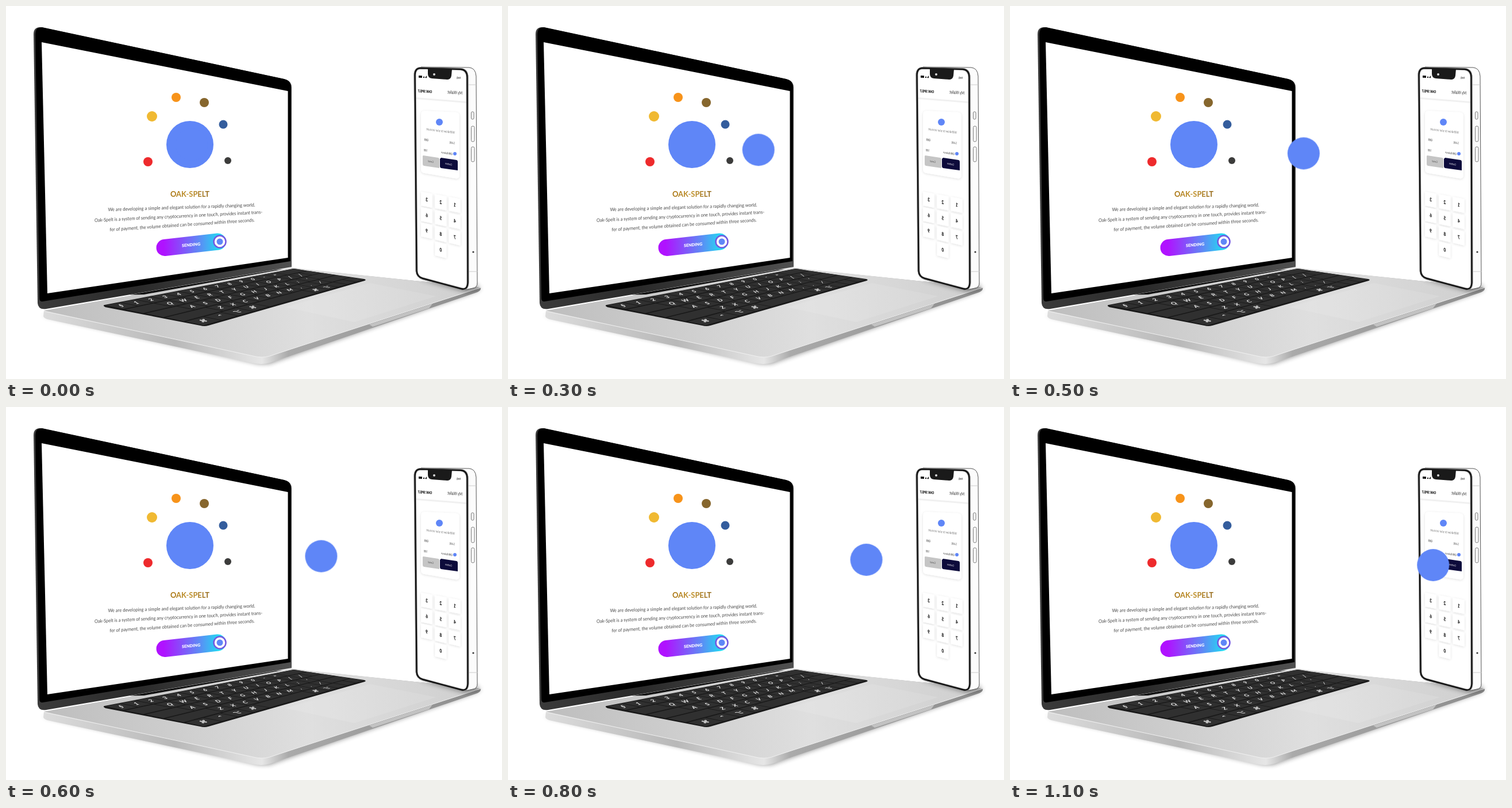
An HTML page that plays this animation: 863x649 px, repeating every 1.2 s.

```html
<!DOCTYPE html>
<html lang="en">
<head>
<meta charset="utf-8">
<title>Sending between devices</title>
<style>
  html, body { margin: 0; width: 100%; height: 100%; overflow: hidden; background: #fff; }
  svg { display: block; }
  text { font-family: Lato, "Open Sans", sans-serif; text-anchor: middle; }
  .copy { font-size: 8.4px; fill: #4a4a4a; }
  .token { animation: fly 1200ms steps(12, end) infinite; }
  @keyframes fly {
    from { transform: translate(323px, 241px); }
    to { transform: translate(773.8px, 278.2px); }
  }
</style>
</head>
<body>
<svg id="stage" width="863" height="649" viewBox="0 0 863 649">
  <defs>
    <linearGradient id="pill" gradientUnits="userSpaceOnUse" x1="262" y1="0" x2="384" y2="0">
      <stop offset=".1" stop-color="#b012ff"/>
      <stop offset=".6" stop-color="#5f88f5"/>
      <stop offset=".9" stop-color="#20dcf2"/>
    </linearGradient>
    <linearGradient id="gold" x1="0" x2="1">
      <stop offset="0" stop-color="#a87410"/>
      <stop offset=".5" stop-color="#c1922c"/>
      <stop offset="1" stop-color="#94691a"/>
    </linearGradient>
    <linearGradient id="deck" gradientUnits="userSpaceOnUse" x1="70" y1="530" x2="800" y2="490">
      <stop offset="0" stop-color="#bebebe"/>
      <stop offset=".35" stop-color="#d0d0d0"/>
      <stop offset=".62" stop-color="#dfdfdf"/>
      <stop offset="1" stop-color="#d0d0d0"/>
    </linearGradient>
    <linearGradient id="edge" gradientUnits="userSpaceOnUse" x1="65" y1="0" x2="826" y2="0">
      <stop offset="0" stop-color="#dcdcdc"/>
      <stop offset=".3" stop-color="#b8b8b8"/>
      <stop offset=".5" stop-color="#e6e6e6"/>
      <stop offset=".56" stop-color="#aaa"/>
      <stop offset="1" stop-color="#8d8d8d"/>
    </linearGradient>
    <linearGradient id="lid" x1="0" x2="1">
      <stop offset="0" stop-color="#3b3b3b"/>
      <stop offset=".4" stop-color="#2a2a2a"/>
      <stop offset="1" stop-color="#505050"/>
    </linearGradient>
    <filter id="soft" x="-20%" y="-20%" width="140%" height="140%"><feGaussianBlur stdDeviation="4"/></filter>
    <filter id="lift" x="-40%" y="-40%" width="180%" height="180%">
      <feDropShadow dx="0" dy="1" stdDeviation="2.2" flood-color="#000" flood-opacity=".13"/>
    </filter>
  </defs>

  <!-- laptop base -->
  <path d="M62 538L440 622L458 622L826 494L760 500L300 545Z" fill="#000" opacity=".45" filter="url(#soft)"/>
  <path d="M66 530L65 540Q66 543 72 545L428 621Q444 625 459 621L820 498Q827 495 826 490L497 456Z" fill="url(#edge)"/>
  <path d="M66 530L497 455L530 459L826 490L459 609Q446 613 430 609Z" fill="url(#deck)"/>
  <path d="M66 531L430 609Q446 613 459 609L826 490" fill="none" stroke="#f0f0f0" stroke-width="1"/>
  <path d="M632 554L638 558L736 526L742 518" fill="#c2c2c2"/>
  <path d="M486 524L633 482L748 505L606 550Z" fill="#fff" opacity=".1"/>
  <path d="M172 520Q167 521 173 524L338 556Q345 558 352 556L624 478Q628 476 623 475L500 457Z" fill="#191919"/>
  <g id="keys"></g>

  <!-- laptop lid -->
  <path d="M48 49Q48 36 61 37L484 127Q497 130 497 142V454L70 527Q56 529 55 517Z" fill="url(#lid)"/>
  <path d="M51 50Q51 36 63 37L484 127Q496 130 496 142L495 444L64 514Q58 515 58 508Z"/>
  <path d="M62 63L490.500 148V438L72 500Z" fill="#fff"/>
  <path d="M215 502.500L470 459L482 458L240 502Z" fill="#111"/>

  <!-- screen content -->
  <g id="coins"></g>
  <circle cx="320" cy="241" r="41" fill="#5f86f7"/>
  <text transform="matrix(.92 0 0 1 320 332)" font-size="14" font-weight="700" fill="url(#gold)">OAK-SPELT</text>
  <text class="copy" transform="matrix(.905 -.029 0 1 305.500 353)">We are developing a simple and elegant solution for a rapidly changing world.</text>
  <text class="copy" transform="matrix(.895 -.044 0 1 300 368.500)">Oak-Spelt is a system of sending any cryptocurrency in one touch, provides instant trans-</text>
  <text class="copy" transform="matrix(.9 -.06 0 1 306.500 383.500)">fer of payment, the volume obtained can be consumed within three seconds.</text>
  <path d="M276 420.500L368.500 410" stroke="url(#pill)" stroke-width="29" stroke-linecap="round"/>
  <circle cx="372" cy="410" r="10.500" fill="#fff" stroke="#7358e0" stroke-width="2.500"/>
  <circle cx="372" cy="410" r="5.500" fill="#5f86f7"/>
  <text transform="matrix(1 -.09 0 1 322 418)" font-size="7.200" font-weight="900" fill="#fff">SENDING</text>

  <!-- phone -->
  <path d="M716 474L800 497L826 492L815 482Z" fill="#000" opacity=".4" filter="url(#soft)"/>
  <path d="M722 106L806 107Q817 108 818 122L820 482Q820 490 812 491L798 494Z" fill="#fcfcfc" stroke="#555" stroke-width="1"/>
  <path id="front" d="M711.500 121Q711 108 722 108L791 110Q802.500 111 802.500 124L803.500 481Q803 495 792 492L725 474Q715 471 714.500 461Z" fill="#fff" stroke="#999" stroke-width="4"/>
  <use href="#front" style="stroke-width: 2.4; stroke: #111"/>
  <path d="M711.500 121Q711 108 722 108L791 110Q802.500 111 802.500 124L803.500 481Q803 495 792 492L725 474Q715 471 714.500 461Z" fill="none" stroke="#111" stroke-width="2.400"/>
  <path d="M734 108L776 109.500L775 121Q774 128 768 128L741 126Q734 125 734 118Z" fill="#1a1a1a"/>
  <circle cx="745" cy="119" r="2" fill="#d8d8d8"/>
  <path d="M714 159L801 166V169L714 162Z" fill="#000" opacity=".06"/>
  <g fill="#fff" stroke="#777" stroke-width="1">
    <rect x="809.500" y="184" width="4.500" height="13" rx="2"/>
    <rect x="809.500" y="209" width="5.500" height="27" rx="2.500"/>
    <rect x="809.500" y="245" width="5.500" height="26" rx="2.500"/>
  </g>
  <circle cx="813" cy="428" r="1.600" fill="#333"/>
  <path d="M805 137H818M806 462H820" stroke="#ccc"/>
  <path d="M718 121L724 121.300V125L718 124.700Z" fill="#111"/>
  <path d="M726 125V123L728 122.500V125ZM729 125L732 121V125.200Z" fill="#111"/>
  <g filter="url(#lift)" fill="#fff">
    <path d="M722 189Q722 182 729 182.500L783 185Q789 185.500 789 192V294Q789 301 782 300L729 291Q722 290 722 284Z"/>
    <path d="M726 226L785 231V244L726 239Z"/>
    <path d="M726 244L785 250V263L726 256Z"/>
  </g>
  <path d="M726 260L752 264Q754 264.500 754 267V282L727 278Q725 277.500 725 275V261Z" fill="#c5c5c5"/>
  <path d="M757 264L784 268Q786 268.500 786 271V286L757 282Q755 281.500 755 279V266Z" fill="#0d0b3b"/>
  <circle cx="754" cy="202" r="6" fill="#5f86f7"/>
  <circle cx="781" cy="257" r="3" fill="#5f86f7"/>
  <g id="pad" filter="url(#lift)" fill="#fff"></g>
  <g id="labels"></g>

  <g class="token"><circle r="28" fill="#5f86f7"/></g>
</svg>
<script>
  const put = (id, html) => document.getElementById(id).innerHTML = html;

  // coins around the centre: x, y, radius, colour
  put('coins', [
    [296, 159, 8, '#f7931a'], [254, 192, 9, '#f0b932'], [345, 168, 8, '#86662d'],
    [378, 206, 7.5, '#345d9d'], [386, 269, 6, '#3c3c3b'], [247, 271, 8, '#ee2a2c']
  ].map(([x, y, r, c]) => `<circle cx="${x}" cy="${y}" r="${r}" fill="${c}"/>`).join(''));

  // keyboard: unit square mapped to the quad on the deck
  const mix = (a, b, t) => a + (b - a) * t;
  function onDeck(t, v) {
    const u = t * 1.25 / (1 + .25 * t);
    return [
      mix(mix(169, 500, u), mix(347, 626, u), v),
      mix(mix(520.5, 456.5, u), mix(556.5, 476, u), v)
    ];
  }
  const rows = [
    { lead: 0, keys: '§1234567890-=', tail: 2 },
    { lead: 2, keys: 'QWERTYUIOP[]', tail: 1 },
    { lead: 2.25, keys: 'ASDFGHJKL;\'', tail: 1.75 },
    { lead: 3, keys: 'ZXCVBNM,./', tail: 2 }
  ].map(({ lead, keys, tail }) => [
    [lead, ''], ...[...keys].map(k => [1, k]), [tail, '']
  ]);
  rows.push([
    [1.4, '⌘'], [1.3, '⌃'], [1.3, '⌥'], [1.4, '⌘'], [4.6, ''],
    [1.2, '⌘'], [1, '⌥'], [1, ''], [1, ''], [1, '']
  ]);

  const keyShape = (a, b, v) => {
    const corners = [[a, v], [b, v], [b, v + .175], [a, v + .175]];
    return `<polygon fill="#303030" points="${corners.map(([t, w]) => onDeck(t, w).map(n => n.toFixed(1))).join(' ')}"/>`;
  };
  const keyText = (t, v, s) => {
    const [x, y] = onDeck(t, v);
    const k = 1 - .3 * t;
    const m = [.95, -.22, .7, .5].map(n => n * k).join(' ');
    return `<text transform="matrix(${m} ${x + 1} ${y + 1.5})" font-size="11.5" font-weight="700" fill="#f2f2f2">${s}</text>`;
  };
  let keys = '';
  rows.forEach((row, i) => {
    const v = .015 + i * .197;
    const total = row.reduce((sum, [w]) => sum + w, 0);
    let at = 0;
    for (const [w, mark] of row) {
      const a = at / total, b = (at += w) / total;
      if (w) keys += keyShape(a + .003, b - .003, v);
      if (mark) keys += keyText((a + b) / 2, v + .095, mark);
    }
  });
  put('keys', keys);

  // phone: everything is seen mirrored and tilts more towards the bottom
  const tilt = y => .02 + (y - 108) * .00065;
  const flip = (x, y, s, size, color = '#333', weight = 400) =>
    `<text transform="matrix(-.72 ${-tilt(y)} 0 1 ${x} ${y + size * .35})" font-size="${size}" font-weight="${weight}" fill="${color}">${s}</text>`;

  let labels = [
    [787.5, 125, '9:41', 5, '#111', 700],
    [781, 150.5, 'My Wallet', 8],
    [729, 148.5, 'OAK SPELT', 6.5, '#111', 900],
    [756, 217, 'Withdraw to your account', 6, '#777'],
    [731.5, 233, 'QRB', 5.2], [776, 238, '5.681', 5.2],
    [730, 251, '100', 5.2], [767, 256, 'QRB Balance', 4.8],
    [739, 270.5, 'Cancel', 4.6, '#444'], [770, 275, 'Confirm', 4.8, '#fff']
  ].map(a => flip(...a)).join('');
  let pad = '';
  for (let n = 0; n < 10; n++) {
    const col = n ? 2 - (n - 1) % 3 : 1;
    const row = n ? Math.floor((n - 1) / 3) : 3;
    const x = 732 + col * 24.4;
    const y = 337 + row * 27 + col * (4.5 + row * .6);
    const s = tilt(y) * 10;
    pad += `<path d="M${x - 9} ${y - 11 - s}L${x + 9} ${y - 11 + s}V${y + 11 + s}L${x - 9} ${y + 11 - s}Z" stroke="#fff" stroke-width="2" stroke-linejoin="round"/>`;
    labels += flip(x, y, n, 9, '#222', 900);
  }
  put('pad', pad);
  put('labels', labels);
</script>
</body>
</html>
```
